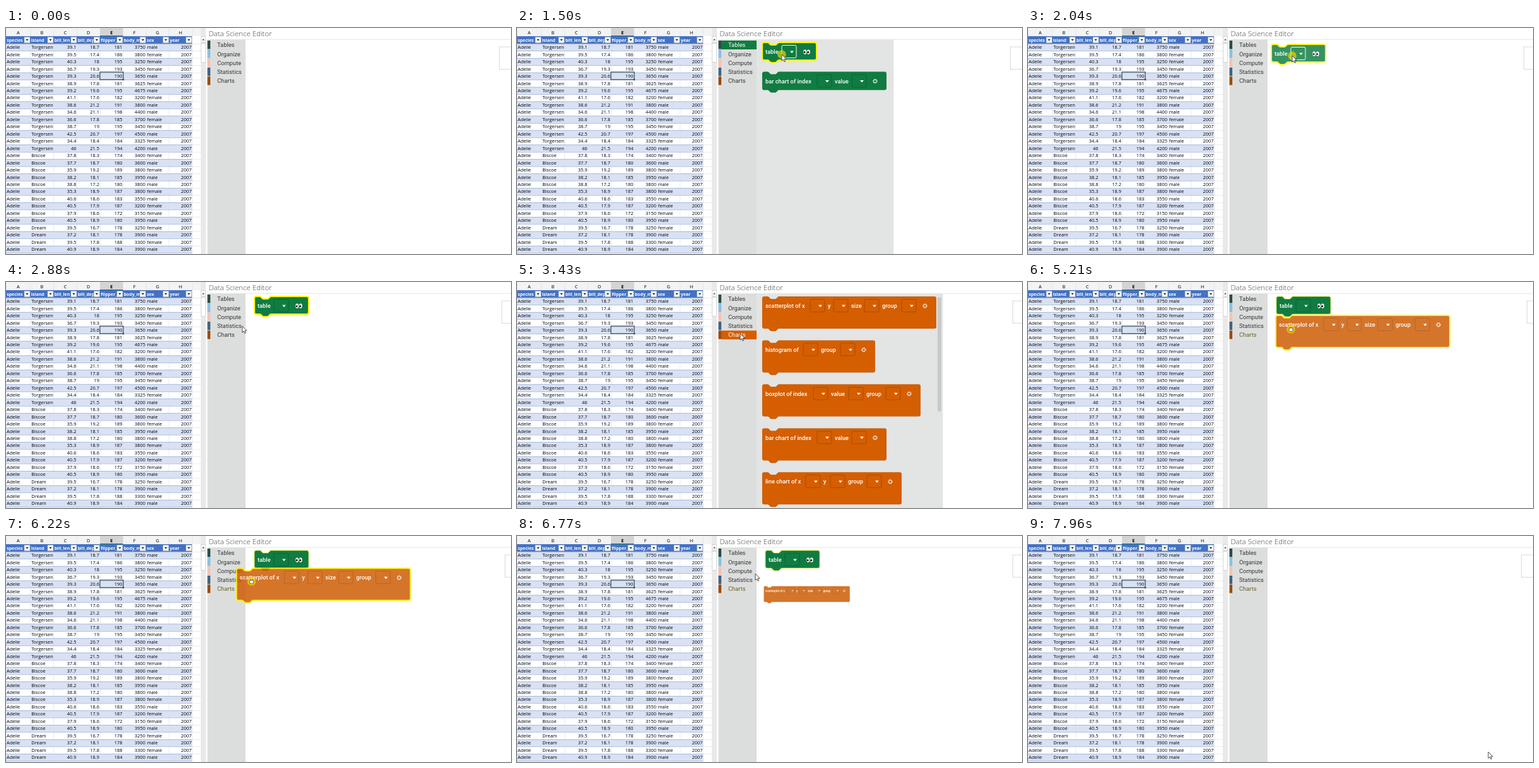
Animation of 801x359 px, one loop 8 s. Source, as an HTML page:

```html
<!DOCTYPE html>
<html lang="en">
<head>
<meta charset="utf-8">
<title>Block editor</title>
<style>
  html, body { margin: 0; width: 100%; height: 100%; overflow: hidden; background: #fff; }
  svg { display: block; }
  text { white-space: pre; }
  .cell { font: 7.4px "Open Sans", "Noto Sans", sans-serif; fill: #000; }
  .head { font: 700 7px "Open Sans", "Noto Sans", sans-serif; fill: #fff; }
  .title { font: 300 11.5px "Open Sans", "Noto Sans", sans-serif; fill: #444; }
  .menu { font: 9.35px Roboto, sans-serif; fill: #333; }
  .label { font: 500 9.25px Roboto, sans-serif; fill: #fff; }
  .end { text-anchor: end; }
  .mid { text-anchor: middle; }
  .active { font-weight: 700; }
</style>
</head>
<body>
<svg id="stage" width="801" height="359" viewBox="0 0 801 359"></svg>
<script>
const GREEN = '#107c41', ORANGE = '#d55e00', HELD_ORANGE = '#cd5a00';
const rect = (x, y, w, h, fill, more = '') =>
  `<rect x="${x}" y="${y}" width="${w}" height="${h}" fill="${fill}" ${more}/>`;
const text = (x, y, cls, s) => `<text x="${x}" y="${y}" class="${cls}">${s}</text>`;
const path = (d, fill, more = '') => `<path d="${d}" fill="${fill}" ${more}/>`;
const group = (id, inner, more = '') => `<g id="${id}" ${more}>${inner}</g>`;

// Spreadsheet
const EDGES = [0, 38.5, 75.5, 112.5, 149, 185.5, 222, 258.5, 295];
const HEADS = ['species', 'island', 'bill_len', 'bill_dep', 'flipper_', 'body_m', 'sex', 'year'];
const ROWS = `39.1 18.7 181 3750 m,39.5 17.4 186 3800 f,40.3 18 195 3250 f,36.7 19.3 193 3450 f
39.3 20.6 190 3650 m,38.9 17.8 181 3625 f,39.2 19.6 195 4675 m,41.1 17.6 182 3200 f
38.6 21.2 191 3800 m,34.6 21.1 198 4400 m,36.6 17.8 185 3700 f,38.7 19 195 3450 f
42.5 20.7 197 4500 m,34.4 18.4 184 3325 f,46 21.5 194 4200 m,37.8 18.3 174 3400 f
37.7 18.7 180 3600 m,35.9 19.2 189 3800 f,38.2 18.1 185 3950 m,38.8 17.2 180 3800 m
35.3 18.9 187 3800 f,40.6 18.6 183 3550 m,40.5 17.9 187 3200 f,37.9 18.6 172 3150 f
40.5 18.9 180 3950 m,39.5 16.7 178 3250 f,37.2 18.1 178 3900 m,39.5 17.8 188 3300 f
40.9 18.9 184 3900 m`.split(/[,\n]/);
const PITCH = 11.464, rowTop = i => 24.9 + i * PITCH;

function sheet() {
  let s = rect(0, 0, 309, 13, '#f3f3f3') + rect(149, 0, 36.5, 12.5, '#d4d4d4');
  EDGES.forEach((x, c) => {
    s += rect(x, 2, .6, 357, '#dcdcdc');
    if (c < 8) s += text((x + EDGES[c + 1]) / 2, 9.6, c == 4 ? 'cell mid active' : 'cell mid', 'ABCDEFGH'[c]);
  });
  s += rect(149, 12, 36.5, 1.2, '#217346') + rect(0, 13, 295, 12, '#4472c4');
  HEADS.forEach((h, c) => {
    const r = EDGES[c + 1];
    s += text(EDGES[c] + 1.2, 21.8, 'head', h) +
      rect(r - 9.5, 14.3, 9, 9.4, '#fff', 'stroke="#9aa5b8" stroke-width=".6"') +
      path(`M${r - 7.3} 17.8h4.6l-2.3 2.8z`, '#222');
  });
  ROWS.forEach((row, i) => {
    const y = rowTop(i), v = row.split(' '), base = y + 8.3;
    if (i % 2 == 0) s += rect(0, y, 295, PITCH, '#d9e1f2');
    s += rect(0, y, 295, .7, '#8ea9db') + rect(295, y, 14, .6, '#dcdcdc');
    s += text(1, base, 'cell', 'Adelie') +
      text(40.3, base, 'cell', i < 15 ? 'Torgersen' : i < 25 ? 'Biscoe' : 'Dream');
    for (let c = 0; c < 4; c++) s += text(EDGES[c + 3] - 1, base, 'cell end', v[c]);
    s += text(223.7, base, 'cell', v[4] == 'm' ? 'male' : 'female') +
      text(294.5, base, 'cell end', '2007');
  });
  s += rect(0, rowTop(29), 295, .7, '#8ea9db');
  s += rect(149, 70, 37, 12, 'none', 'stroke="#2c4a55" stroke-width="1.2"') +
    rect(184.8, 80.8, 2.4, 2.4, '#2c4a55');
  // scroll bar
  return s + rect(309, 0, 8, 359, '#e9e9e9') +
    rect(309.5, 13.5, 7, 9, '#fff', 'stroke="#c8c8c8" stroke-width=".7"') +
    path('M311 19.5h4l-2-2.6z', '#555') +
    rect(309.5, 24.5, 7, 30, '#fff', 'stroke="#c8c8c8" stroke-width=".7"');
}

// Toolbox
const MENU = [['Tables', '#2a4d46'], ['Organize', '#88bfe6'], ['Compute', '#f5c1b2'],
  ['Statistics', '#3f6384'], ['Charts', '#9c4a0c']];
const menuTop = i => 20 + i * 14.3;

const toolbox = () => rect(319.5, 18.5, 60.5, 341, '#dcdedd') +
  rect(324, 0, 56, 14, GREEN, 'id="pick"') +
  MENU.map(([name, colour], i) =>
    rect(319.5, menuTop(i), 4.6, 13.4, colour) +
    `<text id="menu${i}" x="335" y="${menuTop(i) + 10.2}" class="menu">${name}</text>`).join('');

// Blocks: labels alternate with drop-downs, given by the x of each arrow
const outline = (w, h) => 'M3 0H8.5c1 0 1.5 .5 2 1l2 2c.5 .5 1 1 2 1h6c1 0 1.5-.5 2-1l2-2c.5-.5 1-1 2-1' +
  `H${w - 3}q3 0 3 3V${h - 3}q0 3-3 3H26.5c-1 0-1.5 .5-2 1l-2 2c-.5 .5-1 1-2 1h-6` +
  'c-1 0-1.5-.5-2-1l-2-2c-.5-.5-1-1-2-1H3q-3 0-3-3V3q0-3 3-3z';
const eye = x => `<ellipse cx="${x}" cy="15" rx="2.5" ry="3.8" fill="#fff"/>` +
  `<circle cx="${x - .6}" cy="15.6" r="1.5" fill="#000"/>`;
const gear = x => `<g fill="none" stroke="#fff"><circle cx="${x}" cy="15" r="2.4"/>` +
  `<circle cx="${x}" cy="15" r="3.3" stroke-dasharray="1.3"/></g>`;

function block(id, colour, h, labels, arrows, eyes) {
  const last = arrows[arrows.length - 1], w = last + 39;
  let s = path(outline(w, h), colour, 'class="body" stroke="#0002" stroke-width=".6"');
  arrows.forEach((a, i) => {
    s += text(i ? arrows[i - 1] + 12 : 5, 18.2, 'label', labels[i]) +
      rect(a - 16, 4.5, 23, 20, 'none', 'class="field" rx="2" stroke="#0003"') +
      path(`M${a - 3} 13.4h6l-3 3.5z`, '#fff');
  });
  return group(id, s + (eyes ? eye(67.7) + eye(73.3) : gear(last + 21)));
}
const table = id => block(id, GREEN, 28, ['table'], [47], true);
const scatter = (id, colour) =>
  block(id, colour, 51, ['scatterplot of x', 'y', 'size', 'group'], [92, 129, 178, 237]);
const bar = (id, colour, h) => block(id, colour, h, ['bar chart of index', 'value'], [103, 158]);
const put = (y, inner) => `<g transform="translate(389 ${y})">${inner}</g>`;

const tablesFlyout = group('tables', rect(380, 18.5, 217.5, 341, '#e3e4e4') +
  put(23, table('tableSource')) + put(69.5, bar('barA', GREEN, 29)));
const chartsFlyout = group('charts', rect(380, 18.5, 295.5, 341, '#e3e4e4') +
  rect(667, 24, 6, 182, '#c9c9c9', 'rx="3"') +
  [scatter('scatterSource', ORANGE),
    block('hist', ORANGE, 51, ['histogram of', 'group'], [81, 140]),
    block('box', ORANGE, 51, ['boxplot of index', 'value', 'group'], [97, 153, 212]),
    bar('barB', ORANGE, 51),
    block('line', ORANGE, 51, ['line chart of x', 'y', 'group'], [85, 124, 182])
  ].map((b, i) => put(23 + i * 69.8, b)).join(''));

document.getElementById('stage').innerHTML =
  sheet() + rect(317, 0, 484, 359, '#fff') +
  text(321.5, 13.2, 'title', 'Data Science Editor') + rect(319.5, 17.8, 482, .7, '#d8d8d8') +
  rect(0, 30, 60, 35.5, '#fff', 'id="panel" stroke="#d9d9d9"') +
  toolbox() + table('table') + scatter('scatter', HELD_ORANGE) + tablesFlyout + chartsFlyout +
  group('pointer',
    '<circle id="click" r="6.8" fill="#f2dc00" fill-opacity=".65"/>' +
    group('hand', rect(-3, -2.5, 6, 6, '#fff', 'rx="2" stroke="#333" stroke-width=".7"') +
      path('M-1 -2.5v2M1 -2.5v2', 'none', 'stroke="#333" stroke-width=".6"')) +
    path('M0 0V10.2L2.3 8 4 11.6 5.6 10.9 4 7.3H7.2z', '#fff', 'id="arrow" stroke="#222" stroke-width=".8"'));

// Motion: [ms, x, y]
const POINTER = [[70, 738, 362], [820, 345, 24], [1020, 345, 24], [1430, 420, 42], [1780, 420, 42],
  [2040, 419, 44], [2180, 425, 41], [2380, 425, 41], [3160, 354, 82], [3700, 354, 82], [4120, 411, 40],
  [4650, 411, 40], [5140, 417, 75], [5810, 417, 75], [6560, 369, 70], [6770, 378, 60], [6980, 402, 40],
  [7050, 402, 40], [7330, 362, 58], [7480, 362, 58], [7960, 730, 343]];
const TABLE = [[1780, 389, 23], [2040, 386, 26], [2180, 394, 23], [7050, 394, 23], [7330, 354, 41]];
const SCATTER = [[4650, 389, 23], [5140, 393, 53], [5810, 393, 53], [6560, 345, 50]];

function along(keys, t) {
  const n = keys.findIndex(k => k[0] > t);
  if (n < 1) return keys[n ? keys.length - 1 : 0].slice(1);
  const [a, b] = [keys[n - 1], keys[n]];
  const u = (t - a[0]) / (b[0] - a[0]), e = u * u * (3 - 2 * u);
  return [a[1] + (b[1] - a[1]) * e, a[2] + (b[2] - a[2]) * e];
}

const $ = id => document.getElementById(id);
const show = (id, on) => $(id).style.display = on ? '' : 'none';
const within = (t, a, b) => t >= a && t < b;

function select(id, strength) {
  const body = $(id).querySelector('.body');
  body.setAttribute('stroke', strength ? '#fff200' : '#0002');
  body.setAttribute('stroke-width', strength ? 2 : .6);
  body.setAttribute('stroke-opacity', strength || 1);
}

// Place a block; once dropped on the toolbox it shrinks away within 160 ms
function place(id, keys, t, w, h, drop, dragged) {
  const p = Math.min(1, Math.max(0, (t - drop) / 160)), [x, y] = along(keys, t);
  show(id, t >= keys[0][0] && p < 1);
  $(id).setAttribute('transform', `translate(${x + w * p / 3} ${y + h * p * 1.15}) scale(${1 - p})`);
  $(id).setAttribute('opacity', dragged ? .83 : 1);
}

function draw(t) {
  const tablesOpen = within(t, 1020, 1780), chartsOpen = within(t, 3360, 4720);
  show('tables', tablesOpen);
  show('charts', chartsOpen);
  show('pick', tablesOpen || chartsOpen);
  $('pick').setAttribute('y', menuTop(chartsOpen ? 4 : 0));
  $('pick').setAttribute('fill', chartsOpen ? ORANGE : GREEN);
  $('menu0').style.fill = tablesOpen ? '#fff' : '';
  $('menu4').style.fill = chartsOpen ? '#fff' : t >= 4720 ? '#66602a' : '';

  const overTable = t >= 1360;
  select('tableSource', overTable ? 1 : 0);
  const tableHeld = within(t, 1780, 2380) || t >= 7050;
  for (const id of ['tableSource', 'table'])
    $(id).querySelector('.field').setAttribute('stroke',
      (id == 'table' ? tableHeld : overTable) ? '#fff' : '#0003');
  select('table', t < 3360 || t >= 6980 ? 1 : .3);
  select('scatterSource', t >= 4060 ? 1 : 0);
  select('scatter', t < 6690 ? 1 : 0);
  place('table', TABLE, t, 86, 28, 7400, tableHeld);
  place('scatter', SCATTER, t, 276, 51, 6690, true);

  $('panel').setAttribute('x', t < 1780 ? 782.5 : t < 4720 ? 786.5 : t < 6560 ? 791.5 : t < 7480 ? 786.5 : 782.5);

  const [x, y] = along(POINTER, t), grabbing = within(t, 4720, 6600);
  show('pointer', t >= 70);
  $('pointer').setAttribute('transform', `translate(${x} ${y})`);
  show('click', within(t, 1430, 2380) || within(t, 4320, 6600) || within(t, 7050, 7400));
  show('hand', grabbing);
  show('arrow', !grabbing);
}

const start = performance.now();
(function tick() {
  draw((performance.now() - start) % 8000);
  requestAnimationFrame(tick);
})();
</script>
</body>
</html>
```
